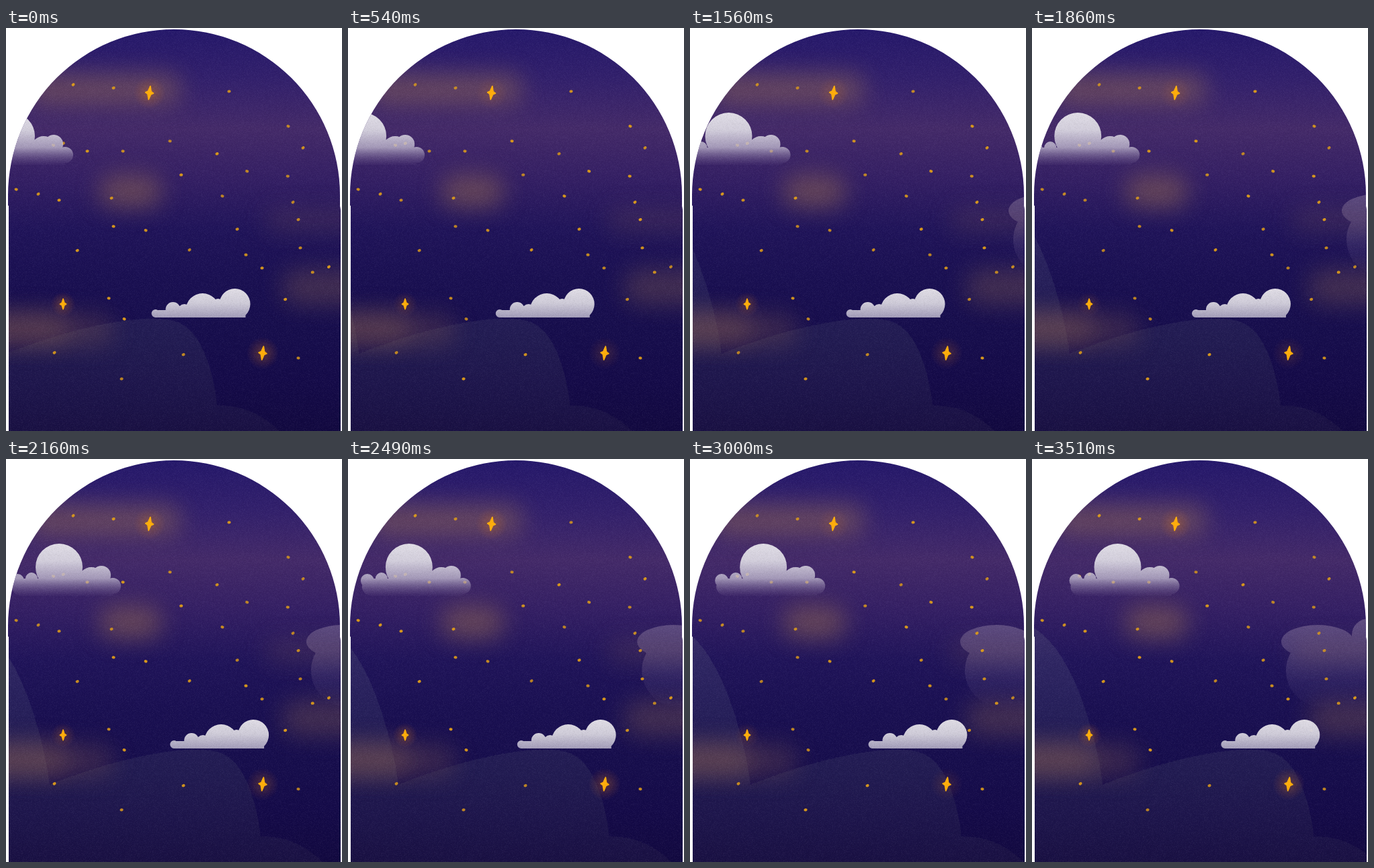
An HTML page with a canvas that plays this animation: 500 by 600 pixels, repeating every 3.54 s.

```html
<!DOCTYPE html>
<html lang="en">
<head>
<meta charset="utf-8">
<title>Night sky</title>
<style>
html, body { margin: 0; width: 100%; height: 100%; overflow: hidden; background: #fff; }
canvas { display: block; }
</style>
</head>
<body>
<canvas id="stage" width="500" height="600"></canvas>
<script>
const W = 500, H = 600, LOOP = 3540, TURN = Math.PI * 2;
const ctx = document.getElementById('stage').getContext('2d');

function makeRandom(seed) {
  return () => (seed = seed * 16807 % 2147483647) / 2147483647;
}

function makeLayer(paint) {
  const layer = document.createElement('canvas');
  layer.width = W;
  layer.height = H;
  paint(layer.getContext('2d'));
  return layer;
}

// Stops are spread evenly from y0 to y1.
function verticalGradient(y0, y1, ...colors) {
  const g = ctx.createLinearGradient(0, y0, 0, y1);
  colors.forEach((color, i) => g.addColorStop(i / (colors.length - 1), color));
  return g;
}

// Union of ellipses [x, y, rx, ry = rx] and a body box from corner to corner.
function puffs(lobes, [left, top, right, bottom]) {
  const path = new Path2D();
  for (const [x, y, rx, ry = rx] of lobes) {
    path.moveTo(x + rx, y);
    path.ellipse(x, y, rx, ry, 0, 0, TURN);
  }
  path.rect(left, top, right - left, bottom - top);
  return path;
}

const arch = new Path2D();
arch.arc(250, 249, 247, Math.PI, 0);
arch.lineTo(497, 265);
arch.lineTo(498, 271);
arch.lineTo(498, H);
arch.lineTo(4, H);
arch.lineTo(4, 265);
arch.lineTo(3, 264);
arch.closePath();

// Rounded slope that starts level at u = 0 and ends steep at u = 1.
const shoulder = (u, a, b) => 1 - (1 - Math.min(1, Math.max(0, u)) ** a) ** b;

function ridge(x) {
  if (x < 0) return 240 + 245 * shoulder((x + 155) / 155, 2.6, 0.8);
  if (x < 210) return 433 + 52 * ((210 - x) / 210) ** 1.6;
  if (x < 314) return 433 + 129 * shoulder((x - 210) / 104, 3.6, 0.75);
  return 562 + 38 * ((x - 314) / 93) ** 2.3;
}

const hills = new Path2D();
hills.moveTo(-160, H);
for (let x = -160; x <= 410; x++) hills.lineTo(x, ridge(x) + 0.6 * Math.sin(x * 0.9) * Math.sin(x * 0.23));
hills.lineTo(410, H);

const farCloud = puffs(
  [[425, 272, 54, 25], [435, 315, 57, 55], [500, 262, 24]],
  [440, 264, 530, 390]);
const moonCloud = puffs(
  [[127, 161, 35], [175, 180, 19], [190, 173, 14], [207, 189, 12], [86, 178, 9], [65, 181, 10], [70, 190, 13]],
  [68, 178, 207, 204]);
const lowCloud = puffs(
  [[223, 425, 6], [249, 419, 11], [266, 421, 10], [293, 420, 25], [316, 412, 9], [341, 411, 23]],
  [223, 420, 357, 431]);

const skyFill = verticalGradient(0, H,
  '#25186b', '#32206c', '#442a69', '#341f64', '#20145a', '#1a1052', '#170e4d', '#150b49', '#120940');
const hillFill = verticalGradient(240, H,
  'rgba(84,80,122,.38)', 'rgba(66,65,110,.32)', 'rgba(56,54,92,.33)', 'rgba(44,36,76,.28)');
const farFill = verticalGradient(238, 380,
  'rgba(146,128,164,.5)', 'rgba(132,116,158,.38)', 'rgba(110,96,146,.18)', 'rgba(90,75,130,0)');
const moonFill = verticalGradient(126, 204,
  'rgba(228,225,233,.98)', 'rgba(218,215,226,.95)', 'rgba(188,180,204,.8)', 'rgba(130,110,158,.05)');
const lowFill = verticalGradient(388, 431,
  'rgba(229,226,233,.98)', 'rgba(215,212,223,.96)', 'rgba(170,164,191,.95)');
lowFill.addColorStop(1, 'rgba(170,164,191,0)');

const hazes = makeLayer(c => {
  c.filter = 'blur(17px)';
  const haze = (x, y, w, h, alpha) => {
    c.fillStyle = `rgba(150,106,84,${alpha})`;
    c.beginPath();
    c.roundRect(x - w / 2, y - h / 2, w, h, h / 2);
    c.fill();
  };
  haze(145, 91, 230, 46, 0.5);
  haze(185, 243, 94, 48, 0.52);
  haze(460, 287, 150, 34, 0.2);
  haze(480, 386, 140, 52, 0.33);
  haze(20, 447, 150, 50, 0.3);
  haze(50, 449, 220, 48, 0.27);
});

const grain = makeLayer(c => {
  const random = makeRandom(7), image = c.createImageData(W, H);
  for (let i = 0; i < image.data.length; i += 4) {
    image.data.fill(random() < 0.5 ? 0 : 255, i, i + 3);
    image.data[i + 3] = random() * 10;
  }
  c.putImageData(image, 0, 0);
});

// A few placed stars set the composition; a seeded scatter fills in the rest.
const keyStars = [
  [100, 84], [160, 89], [332, 94], [244, 168], [420, 146], [442, 178], [314, 187], [121, 183],
  [174, 183], [322, 250], [427, 259], [157, 253], [79, 256], [160, 295], [208, 301], [273, 330],
  [435, 285], [438, 327], [153, 402], [176, 433], [72, 483], [264, 486], [172, 522], [435, 491]
];
const scatter = makeRandom(41);
const smallStars = keyStars.concat(
  Array.from({ length: 14 }, () => [15 + 475 * scatter(), 130 + 280 * scatter()]));

const bigStars = [
  { x: 213.5, y: 96.5, size: 10.5, phase: 0 },
  { x: 85, y: 411, size: 8, phase: -0.6 },
  { x: 382, y: 484, size: 10.5, phase: -0.3 }
];

const twinkle = (t, phase) => Math.cos(t / LOOP * 3 * TURN + phase);

function fillAt(path, dx, fill) {
  ctx.save();
  ctx.translate(dx, 0);
  ctx.fillStyle = fill;
  ctx.fill(path);
  ctx.restore();
}

function drawSmallStar([x, y], i, t) {
  ctx.globalAlpha = 0.92 + 0.08 * twinkle(t, i);
  ctx.fillStyle = '#d9981c';
  ctx.beginPath();
  ctx.ellipse(x, y + 0.3, 2.6, 2.1, -0.5 + (i % 5) * 0.2, 0, TURN);
  ctx.fill();
  ctx.globalAlpha = 1;
}

function drawBigStar({ x, y, size, phase }, t) {
  const glow = size * 2.3, power = 0.27 + 0.09 * twinkle(t, phase);
  const g = ctx.createRadialGradient(x, y, 0, x, y, glow);
  g.addColorStop(0, `rgba(225,125,25,${power})`);
  g.addColorStop(0.45, `rgba(205,110,35,${power * 0.55})`);
  g.addColorStop(1, 'rgba(190,95,45,0)');
  ctx.fillStyle = g;
  ctx.fillRect(x - glow, y - glow, glow * 2, glow * 2);

  ctx.save();
  ctx.translate(x, y);
  ctx.rotate(size > 9 ? 0.13 : 0);
  ctx.beginPath();
  for (let i = 0; i < 8; i++) {
    const angle = i * TURN / 8;
    const reach = size * (i % 2 ? 0.3 : i % 4 ? 0.95 : 0.56);
    ctx.lineTo(Math.cos(angle) * reach, Math.sin(angle) * reach);
  }
  ctx.closePath();
  ctx.fillStyle = ctx.strokeStyle = '#ffae0b';
  ctx.lineWidth = 1.8;
  ctx.lineJoin = 'round';
  ctx.fill();
  ctx.stroke();
  ctx.restore();
}

function draw(t) {
  const s = t / 1000;
  ctx.clearRect(0, 0, W, H);
  ctx.save();
  ctx.clip(arch);
  ctx.fillStyle = skyFill;
  ctx.fillRect(0, 0, W, H);
  fillAt(farCloud, 154 - 23.76 * s - 5.73 * s * s, farFill);
  fillAt(hills, 29.9 * s, hillFill);
  ctx.drawImage(hazes, 0, 0);
  smallStars.forEach((star, i) => drawSmallStar(star, i, t));
  bigStars.forEach(star => drawBigStar(star, t));
  fillAt(moonCloud, 35.9 * s - 6.6 * (1 - Math.exp(-3 * s)) - 119, moonFill);
  fillAt(lowCloud, 3.7 * s + 4.2 * s * s - 0.5, lowFill);
  ctx.drawImage(grain, 0, 0);
  ctx.restore();
}

function tick() {
  draw(performance.now() % LOOP);
  requestAnimationFrame(tick);
}
tick();
</script>
</body>
</html>
```
